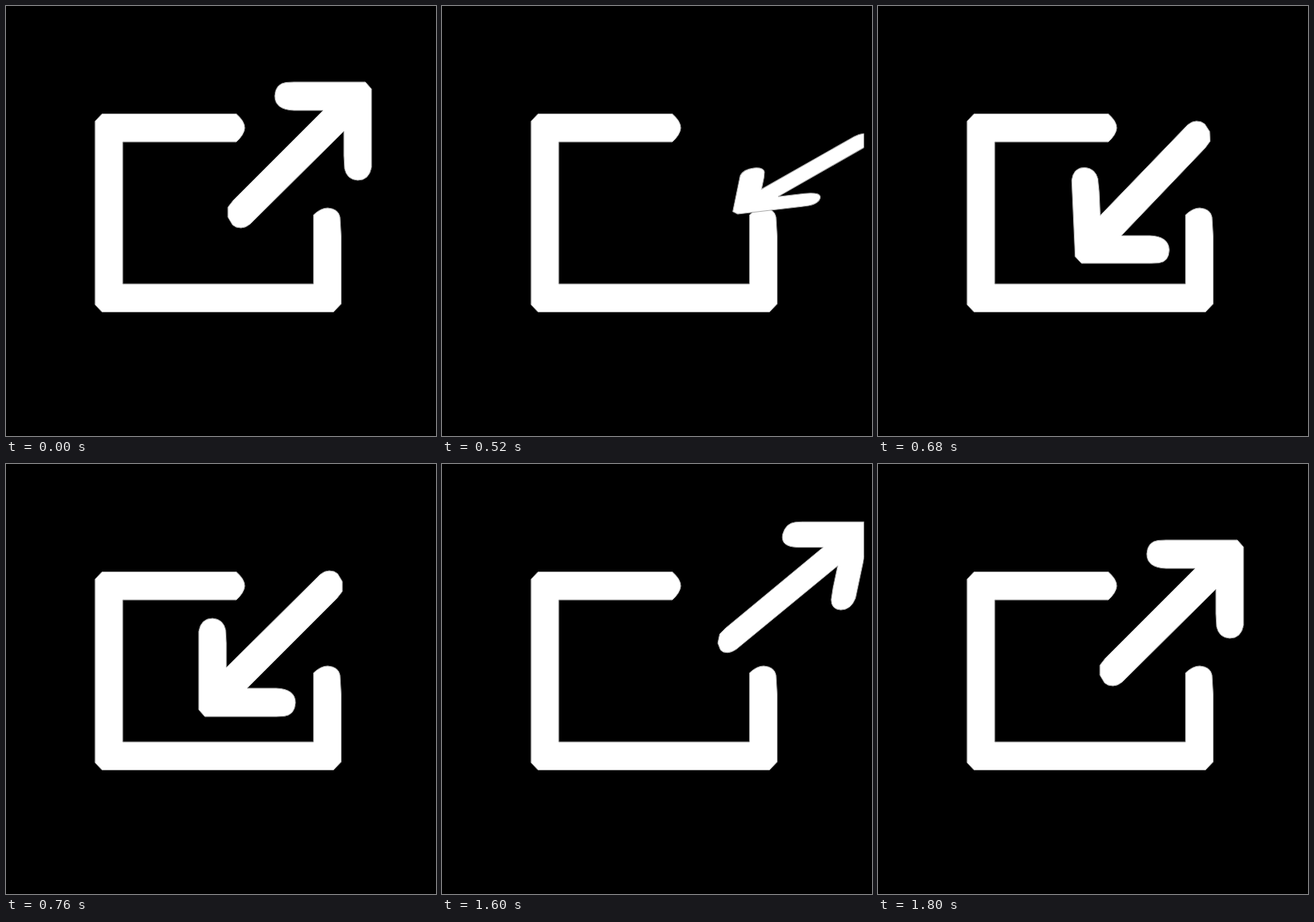
An HTML page for the animation above (2100 ms loop, 560x560 px).

```html
<!DOCTYPE html>
<html lang="en">
<head>
<meta charset="utf-8">
<title>Export and import icon</title>
<style>
  html, body { margin: 0; width: 100%; height: 100%; overflow: hidden; background: #000; }
  svg { display: block; width: 100%; height: 100%; }
  path { fill: #fff; stroke: #aaa; stroke-width: 1; vector-effect: non-scaling-stroke; }
</style>
</head>
<body>
<svg viewBox="0 0 560 560">
  <clipPath id="stage"><rect width="549.5" height="560"/></clipPath>
  <path d="M125 140.5H300Q311 150 311 159Q310 168 300 177H152V362H400.5V272Q410 263 419 263
    Q433 264 435 275L436.5 300V388L426.5 398.5H125L116 389V150Z"/>
  <g clip-path="url(#stage)">
    <path id="arrow" d="M375 99H468L476 108V210Q473 227 458 227Q444 226 441 212L440 195V163L318 284
      Q312 289 306 289Q299 289 295 285L289 275V262L296 253L413 136H375Q350 135 350 117Q351 101 365 99.5Z"/>
  </g>
</svg>
<script>
const LOOP = 2100, STEP = 40, IN_START = 480, OUT_START = 1520;
const CENTER = { x: 383, y: 194 }, IN_CENTER = { x: 344, y: 234 };
const arrow = document.getElementById("arrow");

// Entrance swing: time, then matrix a b c d and offset x y from the resting place.
const SWING = [
  [0, 0.9, -0.21, 0, 0.025, 177, 2],
  [80, 0.893, 0, -0.19, 0.897, 75.5, -33.5],
  [120, 0.905, 0, 0.175, 0.9, -1, 34],
  [280, 1, 0, 0, 1, 0, 0],
];

function poseAt(time) {
  const last = SWING.length - 1;
  if (time >= SWING[last][0]) return SWING[last].slice(1);
  const i = SWING.findIndex(key => key[0] > time) - 1;
  const [from, to] = [SWING[i], SWING[i + 1]];
  let p = (time - from[0]) / (to[0] - from[0]);
  if (i + 1 === last) p = 1 - (1 - p) ** 2;
  return from.slice(1).map((v, k) => v + (to[k + 1] - v) * p);
}

function draw(now) {
  const t = Math.floor((now % LOOP) / STEP) * STEP;
  const inward = t >= IN_START && t < OUT_START;
  const start = inward ? IN_START : t < IN_START ? OUT_START - LOOP : OUT_START;
  const [a, b, c, d, x, y] = poseAt(t - start);
  const center = inward ? IN_CENTER : CENTER;
  arrow.setAttribute("transform",
    `matrix(${a} ${b} ${c} ${d} ${center.x + x} ${center.y + y}) ` +
    `rotate(${inward ? 180 : 0}) translate(${-CENTER.x} ${-CENTER.y})`);
}

let origin;
function frame(now) {
  origin ??= now;
  draw(now - origin);
  requestAnimationFrame(frame);
}
draw(0);
requestAnimationFrame(frame);
</script>
</body>
</html>
```
